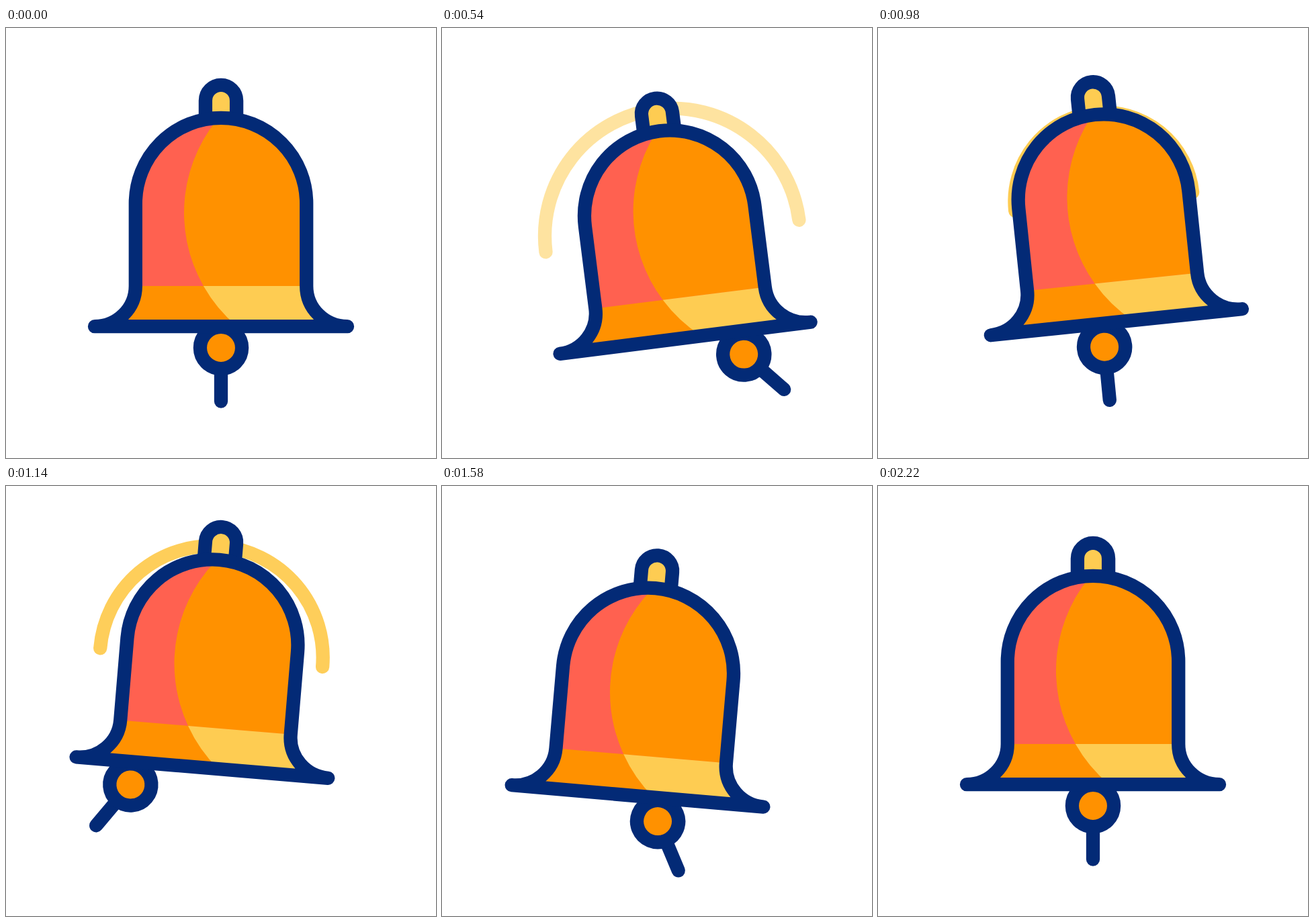
An HTML page that plays this animation: 640 by 640 pixels, repeating every 2.4 s.

```html
<!DOCTYPE html>
<html lang="en">
<head>
<meta charset="utf-8">
<title>Ringing bell</title>
<style>
  html, body { margin: 0; width: 100%; height: 100%; overflow: hidden; background: #fff; }
  svg { display: block; width: 100%; height: 100%; }
  .line { fill: none; stroke: #032a76; stroke-width: 20.3; stroke-linecap: round; stroke-linejoin: round; }
  .red { fill: #ff6150; }
  .orange { fill: #ff9100; }
  .yellow { fill: #fecc52; }
</style>
</head>
<body>
<svg viewBox="0 0 640 640">
  <defs>
    <path id="outline" d="M132 444.2A60.8 60.2 0 0 0 192.8 384V261A127.2 127.2 0 0 1 447.2 261V384A60.8 60.2 0 0 0 508 444.2Z"/>
    <clipPath id="body"><use href="#outline"/></clipPath>
  </defs>
  <g id="bell">
    <path id="wave" fill="none" stroke="#fecc52" stroke-width="20.3" stroke-linecap="round"/>
    <g id="clapper">
      <path class="line" d="M320 507V555.5"/>
      <circle class="orange" cx="320" cy="476" r="31"/>
      <circle class="line" cx="320" cy="476" r="31.1"/>
    </g>
    <path class="yellow" d="M297 134V108A23 23 0 0 1 343 108V134Z"/>
    <path class="line" d="M296.9 134V108A23.1 23.1 0 0 1 343.1 108V134"/>
    <g clip-path="url(#body)">
      <path class="red" d="M130 120H510V450H130Z"/>
      <path class="orange" d="M130 384H510V450H130Z"/>
      <path class="orange" d="M325 124A220 220 0 0 0 293.9 384H510V124Z"/>
      <path class="yellow" d="M293.9 384A220 220 0 0 0 344.1 444.3H510V384Z"/>
    </g>
    <use href="#outline" class="line"/>
  </g>
</svg>
<script>
  const LOOP = 2400, STEP = 20;
  const START = 200, BEAT = 500, BEATS = 4;
  const WAVE_GAP = 700, WAVES = 3, FADE_FROM = 0.4;

  const el = id => document.getElementById(id);
  const bell = el('bell'), clapper = el('clapper'), wave = el('wave');

  function ease(u) {
    u = Math.min(1, Math.max(0, u));
    return u * u * (3 - 2 * u);
  }

  // Eases from rest through one peak per beat and back to rest; lag delays the middle beats.
  function sway(t, peaks, lag = 0) {
    const time = i => START + BEAT * i + lag * Math.min(i, BEATS - i);
    const peak = i => peaks[i - 1] || 0;
    let value = 0;
    for (let i = 0; i < BEATS; i++) {
      value += (peak(i + 1) - peak(i)) * ease((t - time(i)) / (time(i + 1) - time(i)));
    }
    return value;
  }

  // The sound wave leaves the dome, widens and fades.
  function drawWave(t) {
    const index = Math.floor((t - START) / WAVE_GAP);
    const age = (t - START - index * WAVE_GAP) / BEAT;
    const visible = index >= 0 && index < WAVES && age < 1;
    const grow = ease(age);
    const r = 127 + 83 * grow, y = 261 + 40 * grow;
    wave.setAttribute('d', `M${320 - r} ${y}A${r} ${r} 0 0 1 ${320 + r} ${y}`);
    wave.setAttribute('opacity', visible ? 1 - ease((age - FADE_FROM) / (1 - FADE_FROM)) : 0);
  }

  function render(t) {
    const lift = sway(t, [26, -26, 26]);
    const tilt = sway(t, [-12, 16, -10], 100);
    const slide = sway(t, [110, -113, 58]);
    const drop = sway(t, [4.3, 2.3, 3.3]);
    const swing = sway(t, [-55, 39, -39]);
    bell.setAttribute('transform', `translate(0 ${lift}) rotate(${tilt} 320 108)`);
    clapper.setAttribute('transform', `translate(${slide} ${drop}) rotate(${swing} 320 476)`);
    drawWave(t);
  }

  const begin = performance.now();
  function tick() {
    const t = (performance.now() - begin) % LOOP;
    render(Math.floor(t / STEP) * STEP);
    requestAnimationFrame(tick);
  }
  tick();
</script>
</body>
</html>
```
